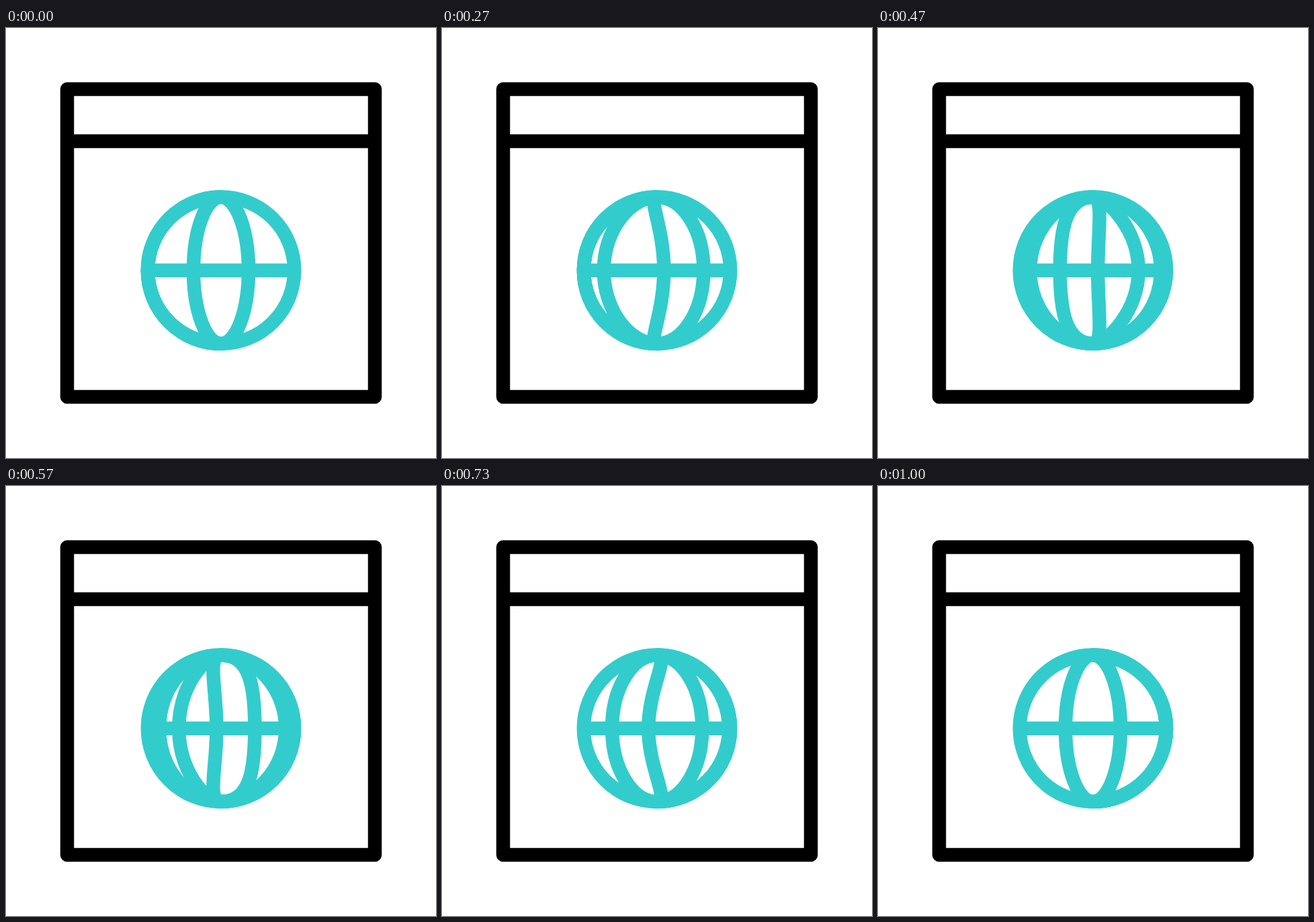
Write an HTML page without scripts that moves like this. It is 640 by 640 pixels and loops after 1.63 s.

```html
<!DOCTYPE html>
<html lang="en">
<head>
<meta charset="utf-8">
<title>Browser globe</title>
<style>
html, body { margin: 0; width: 100%; height: 100%; overflow: hidden; background: #fff; }
svg { display: block; width: 100%; height: 100%; fill: none; stroke-width: 20.5; stroke-linejoin: round; }
.window { stroke: #000; }
.globe { stroke: #3cc; }

/* Meridians sweep from the left rim to the right rim. */
.globe path { animation: 1630ms linear infinite; }
.globe .m1 { animation-name: m1; }
.globe .m2 { animation-name: m2; }
.globe .m3 { animation-name: m3; }
.globe .m4 { animation-name: m4; }
.globe .m5 { animation-name: m5; }
.globe .m6 { animation-name: m6; }

@keyframes m1 {
  0%, 2.02% { d: path("M0 -109C22.6 -109 41 -60 41 0S22.6 109 0 109"); animation-timing-function: cubic-bezier(.33, 0, .67, .33); }
  10.43% { d: path("M0 -109C29.5 -109 53.5 -60 53.5 0S29.5 109 0 109"); }
  22.7% { d: path("M0 -109C47 -109 85 -60 85 0S47 109 0 109"); }
  31.96%, 100% { d: path("M0 -109C60 -109 109 -60 109 0S60 109 0 109"); }
}
@keyframes m2 {
  0%, 2.02% { d: path("M0 -109C-22.6 -109 -41 -60 -41 0S-22.6 109 0 109"); animation-timing-function: cubic-bezier(.33, 0, .67, .33); }
  10.43% { d: path("M0 -109C-22 -109 -19 -71 -19 0S-22 109 0 109"); }
  22.7% { d: path("M0 -109C-8 -109 39 -60 39 0S-8 109 0 109"); }
  34.97% { d: path("M0 -109C50 -109 96 -60 96 0S50 109 0 109"); }
  38.04%, 100% { d: path("M0 -109C60 -109 109 -60 109 0S60 109 0 109"); }
}
@keyframes m3 {
  0%, 12.39% { d: path("M0 -109C-60 -109 -109 -60 -109 0S-60 109 0 109"); }
  22.7% { d: path("M0 -109C-12 -109 -36.5 -60 -36.5 0S-12 109 0 109"); }
  34.97% { d: path("M0 -109C44 -109 50 -60 50 0S44 109 0 109"); }
  44.79% { d: path("M0 -109C59 -109 107 -60 107 0S59 109 0 109"); }
  46%, 100% { d: path("M0 -109C60 -109 109 -60 109 0S60 109 0 109"); }
}
@keyframes m4 {
  0%, 20.25% { d: path("M0 -109C-60 -109 -109 -60 -109 0S-60 109 0 109"); }
  22.7% { d: path("M0 -109C-60 -109 -92 -60 -92 0S-60 109 0 109"); }
  34.97% { d: path("M0 -109C-22 -109 -7 -60 -7 0S-22 109 0 109"); }
  44.79% { d: path("M0 -109C37 -109 67 -60 67 0S37 109 0 109"); }
  50.92% { d: path("M0 -109C57 -109 103 -60 103 0S57 109 0 109"); }
  53.37%, 100% { d: path("M0 -109C60 -109 109 -60 109 0S60 109 0 109"); }
}
@keyframes m5 {
  0%, 25.89% { d: path("M0 -109C-60 -109 -109 -60 -109 0S-60 109 0 109"); }
  34.97% { d: path("M0 -109C-26 -109 -63 -60 -63 0S-26 109 0 109"); }
  44.79% { d: path("M0 -109C20 -109 -13 -60 -13 0S20 109 0 109"); }
  50.92% { d: path("M0 -109C22 -109 15.5 -68 15.5 0S22 109 0 109"); animation-timing-function: cubic-bezier(.33, .67, .67, 1); }
  61.35%, 100% { d: path("M0 -109C22.6 -109 41 -60 41 0S22.6 109 0 109"); }
}
@keyframes m6 {
  0%, 28.34% { d: path("M0 -109C-60 -109 -109 -60 -109 0S-60 109 0 109"); }
  34.97% { d: path("M0 -109C-51 -109 -92 -60 -92 0S-51 109 0 109"); }
  44.79% { d: path("M0 -109C-37 -109 -67 -60 -67 0S-37 109 0 109"); }
  50.92% { d: path("M0 -109C-29.5 -109 -53.5 -60 -53.5 0S-29.5 109 0 109"); animation-timing-function: cubic-bezier(.33, .67, .67, 1); }
  61.35%, 100% { d: path("M0 -109C-22.6 -109 -41 -60 -41 0S-22.6 109 0 109"); }
}
</style>
</head>
<body>
<svg viewBox="0 0 640 640">
  <g class="window">
    <rect x="91" y="91" width="458" height="458"/>
    <path d="M91 168.6H549"/>
  </g>
  <g class="globe" transform="translate(320 360.8)">
    <circle r="109.2"/>
    <line x1="-109" x2="109"/>
    <path class="m1" d="M0 0"/>
    <path class="m2" d="M0 0"/>
    <path class="m3" d="M0 0"/>
    <path class="m4" d="M0 0"/>
    <path class="m5" d="M0 0"/>
    <path class="m6" d="M0 0"/>
  </g>
</svg>
</body>
</html>
```
